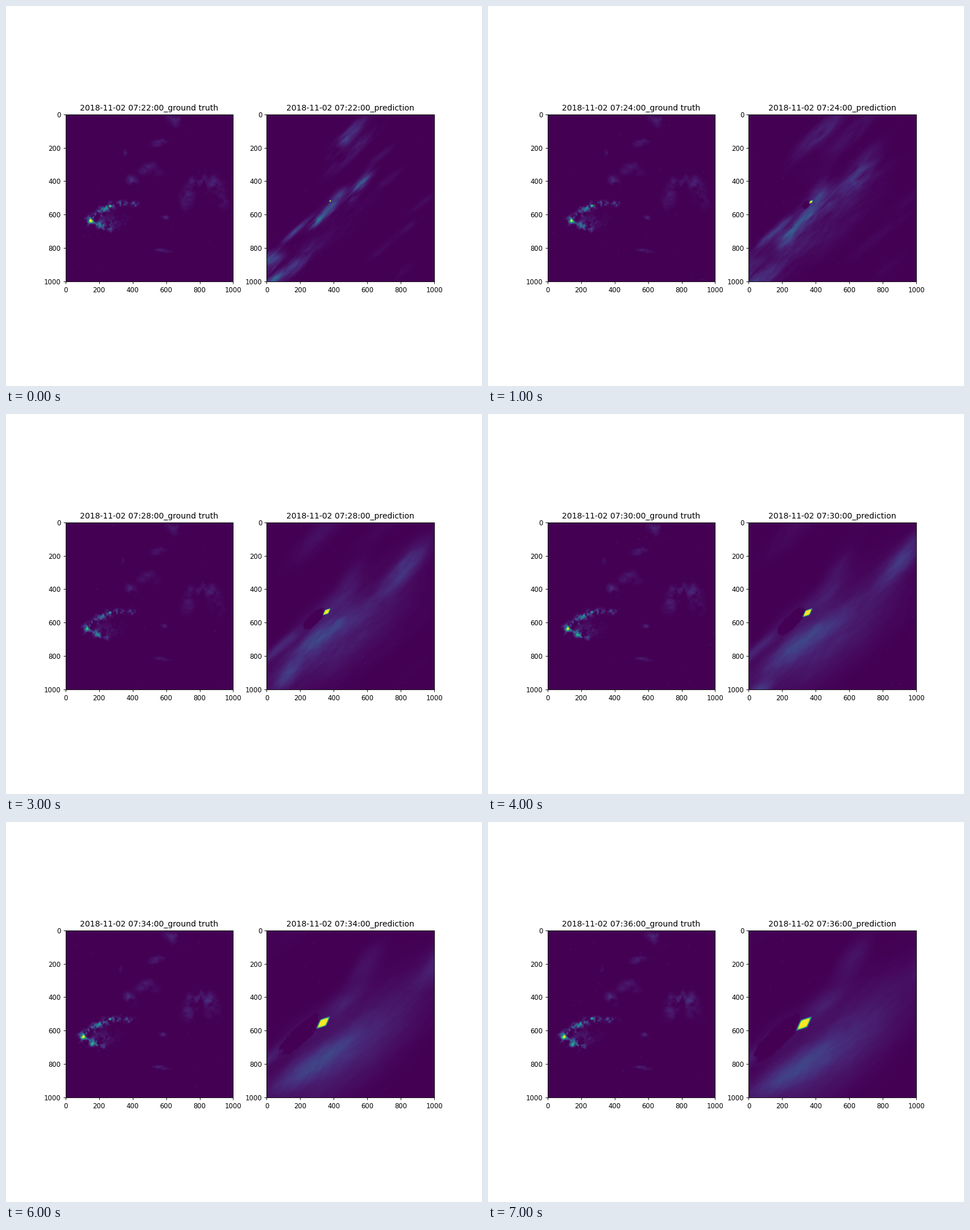
Write a matplotlib script that moves like this. It is 837 by 669 pixels and loops after 8000 ms.

```python
import numpy as np
import matplotlib.pyplot as plt
from matplotlib.animation import FuncAnimation

DPI = 83.7
STEPS = 8
N = 500

axis = (np.arange(N) + 0.5) * 1000 / N
X, Y = np.meshgrid(axis, axis)
GRID = np.random.default_rng(11).random((64, 64))


def value_noise(x, y):
    i, j = np.floor(x).astype(int), np.floor(y).astype(int)
    fx, fy = x - i, y - j
    fx, fy = fx * fx * (3 - 2 * fx), fy * fy * (3 - 2 * fy)
    i0, i1, j0, j1 = i % 64, (i + 1) % 64, j % 64, (j + 1) % 64
    top = GRID[j0, i0] * (1 - fx) + GRID[j0, i1] * fx
    low = GRID[j1, i0] * (1 - fx) + GRID[j1, i1] * fx
    return top * (1 - fy) + low * fy


def fractal(x, y, octaves=3, fade=0.7):
    """Layered noise with zero mean and about unit deviation."""
    weights = fade ** np.arange(octaves)
    total = sum(w * (value_noise(x * 2**k + 17 * k, y * 2**k + 9 * k) - 0.5)
                for k, w in enumerate(weights))
    return total / (0.2 * np.sqrt(np.sum(weights**2)))


def turned(x, y, degrees):
    """Coordinates along and across a line rising to the right."""
    a = np.radians(degrees)
    dx, dy = X - x, Y - y
    return dx * np.cos(a) - dy * np.sin(a), dx * np.sin(a) + dy * np.cos(a)


def blob(x, y, length, width, angle=0):
    u, v = turned(x, y, angle)
    return np.exp(-(u / length) ** 2 - (v / width) ** 2)


def add_specks(field, count, seed):
    rng = np.random.default_rng(seed)
    rows, cols = rng.integers(0, N, (2, count))
    field[rows, cols] = np.maximum(field[rows, cols],
                                   rng.uniform(0.2, 0.6, count))


def storm_cell(t, tip):
    """Wedge of two arms that open to the right of the tip."""
    cell = np.zeros((N, N))
    for s in np.linspace(0, 1, 10):
        x = tip + s * (275 + 4 * t)
        y = 642 - 104 * np.sin(np.pi / 2 * min(1, 1.7 * s))
        cell += (0.26 - 0.08 * s) * blob(x, y, 23, 25 - 13 * s)
    for s in np.linspace(0, 1, 5):
        cell += 0.2 * blob(tip + 105 * s, 643 + (35 + 2 * t) * s, 24, 22)
    cell += 0.05 * blob(tip + 140, 640, 70, 45)
    return cell * np.clip(0.6 + 0.65 * fractal(X / 27 + 0.25 * t, Y / 27), 0, 1.9)


def echoes(t):
    """Thin scattered rain: loose clusters and one arch."""
    thin = np.zeros((N, N))
    rng = np.random.default_rng(5)
    clusters = ((665, 45, 75, 40), (580, 172, 75, 20), (412, 400, 38, 50),
                (515, 340, 60, 38), (560, 817, 50, 14), (590, 618, 30, 18))
    for x, y, w, h in clusters:
        for dx, dy in rng.normal(0, 0.5, (6, 2)):
            thin += 0.025 * blob(x + w * dx - 3 * t, y + h * dy + t, w / 2, h / 2)
    for a in np.linspace(0, np.pi, 9):
        x = 825 - 3 * t - (105 - 5 * t) * np.cos(a)
        y = 530 - 4 * t - (140 - 5 * t) * np.sin(a)
        thin += 0.035 * blob(x, y, 38, 42)
    thin += 0.14 * blob(352 - 4.5 * t, 231, 10, 15)
    return thin * np.clip(0.8 + 0.5 * fractal(X / 50 + 0.06 * t, Y / 50), 0, 2)


def truth(t):
    tip = 148 - 8 * t
    gain = 1.1 - 0.4 * np.exp(-((t - 2.3) / 1.3) ** 2)
    field = gain * (storm_cell(t, tip) + echoes(t))
    field += 0.5 * gain**3 * blob(tip, 639, 14, 10)
    field += 0.65 * blob(264, 550 - 3 * t, 8, 6)
    field += (0.15 + 0.05 * t) * blob(230 - 12 * t, 665 + 3 * t, 14, 11)
    add_specks(field, 22, 40 + t)
    return np.clip(field, 0, 1)


def forecast(t):
    field = np.zeros((N, N))
    spread = 1 + 0.55 * np.sqrt(t)

    def streak(start, speed, length, width, amp, life=1e3, angle=42):
        """A band that drifts, widens and dies away."""
        x, y = np.add(start, np.multiply(speed, t))
        field[:] += amp * np.exp(-t / life) * blob(x, y, length * spread,
                                                   width * spread, angle)

    def grown(amp, pace):
        return amp * (1 - np.exp(-t / pace))

    # upper bands
    streak((480, 140), (-45, -32), 130, 30, 0.13, 2.5, 46)
    streak((520, 220), (80, -85), 170, 28, 0.07, 2, 43)
    streak((560, 425), (88, -50), 95, 26, 0.18, 14, 50)
    # body, dense patch and left branch
    streak((365, 570), (-13, 38), 115, 28, 0.19, 30, 42 - 1.5 * t)
    streak((295, 640), (-58, 92), 45, 20, 0.2, 8)
    streak((165, 705), (-30, 15), 85, 13, 0.15, 9)
    # lower left corner
    streak((15, 890), (-45, 60), 75, 50, 0.2, 1.2)
    streak((40, 990), (0, 35), 80, 24, 0.18, 1.2, 30)
    streak((180, 890), (-40, 30), 150, 40, 0.09, 2)
    # haze that builds up around the path
    streak((450, 640), (11, 9), 215, 75, 0.02 + grown(0.08, 2))
    streak((410, 470), (30, -42), 65, 24, grown(0.05, 1), angle=56)
    streak((425, 480), (2, -5), 60, 22, 0.06, angle=40)
    streak((360, 535), (-27, 14), 75, 32, grown(0.03, 2))
    # stray wisps on the right
    rng = np.random.default_rng(3)
    for x, y in zip(rng.uniform(650, 1000, 6), np.linspace(250, 950, 6)):
        streak((x, y), (25, -25), 90, 20, 0.025, 2, 38)

    # combed texture, washing out with time
    u, v = turned(500, 500, 44)
    grain = fractal(u / 130 + 0.3 * t, v / 30)
    field *= np.clip(1 + (0.06 + 0.34 * np.exp(-t / 1.5)) * grain, 0.1, 1.8)

    # cleared hole behind the hot spot
    if t:
        u, v = turned(372 - 29 * t, 527 + 17 * t, 44)
        rim = np.abs(u / (26 * t)) ** 2.6 + np.abs(v / (12 + 6 * t)) ** 2.6
        rim += 0.13 * fractal(X / 24, Y / 24, 2)
        field *= np.clip((rim - 0.85) / 0.3, 0, 1)

    # hot spot, a growing rhombus
    u, v = turned(380 - 7 * t, 519 + 5.7 * t, 42)
    dist = np.abs(u / (9 + 8.4 * t)) ** 1.1 + np.abs(v / (5 + 3.7 * t)) ** 1.1
    field = np.maximum(field, np.clip(2.6 * (1 - dist), 0, 1))
    add_specks(field, 18, 70 + t)
    return np.clip(field, 0, 1)


fig, axes = plt.subplots(1, 2, figsize=((837 + 1e-6) / DPI, (669 + 1e-6) / DPI), dpi=DPI)
fig.subplots_adjust(bottom=0.1098, top=0.8798)
fields = [(truth(t), forecast(t)) for t in range(STEPS)]
images = []
for ax in axes:
    images.append(ax.imshow(np.zeros((N, N)), cmap="viridis", vmin=0, vmax=1,
                            extent=(0, 1000, 1000, 0)))
    ax.set_xticks(range(0, 1001, 200))
    ax.set_yticks(range(0, 1001, 200))


def draw(t):
    for ax, image, field, kind in zip(axes, images, fields[t],
                                      ("ground truth", "prediction")):
        image.set_data(field)
        ax.set_title(f"2018-11-02 07:{22 + 2 * t}:00_{kind}")
    return images


anim = FuncAnimation(fig, draw, frames=STEPS, interval=1000, repeat=True,
                     repeat_delay=0, blit=False)
plt.show()
```
